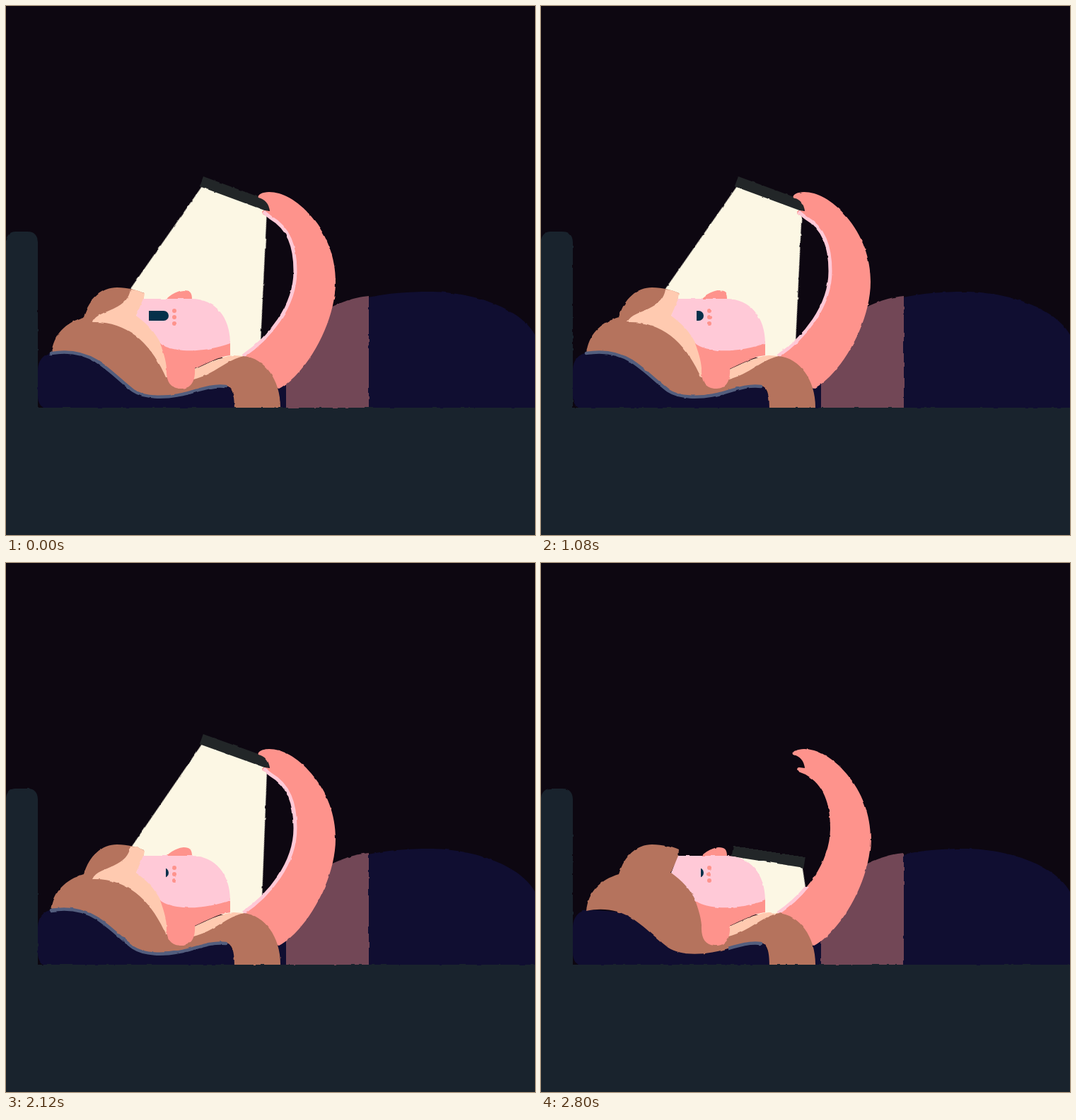
Animation of 748x748 px, one loop 2.84 s. Source, as an HTML page:

```html
<!DOCTYPE html>
<html lang="en">
<head>
<meta charset="utf-8">
<title>Late night phone</title>
<style>
  html, body { margin: 0; width: 100%; height: 100%; overflow: hidden; background: #0d0711; }
  svg { display: block; width: 100vw; height: 100vh; }

  .bed { fill: #19232d; }
  .navy { fill: #100e31; }
  .dress { fill: #724756; }
  .skin { fill: #fe938c; }
  .face { fill: #ffc9d7; }
  .hair { fill: #b5735d; }
  .glow { fill: #ffcab0; }
  .beam { fill: #fcf7e4; }
  .case { fill: #222628; }
  .eye { fill: #06304a; }
  .rim { fill: none; stroke: #ffc9d7; stroke-width: 5; stroke-linejoin: round; }
  .seam { fill: none; stroke: #535e7e; stroke-width: 4.5; stroke-linecap: round; }

  #phone, #lid, #reach { animation: 2840ms linear infinite; }
  #phone { animation-name: drop; }
  #lid { animation-name: droop; }
  #reach { animation-name: dim; }

  @keyframes drop {
    0%, 73% { transform: translate(279px, 241px) rotate(20.3deg); animation-timing-function: ease-in-out; }
    79%, 85% { transform: translate(278px, 247px) rotate(17.2deg); animation-timing-function: cubic-bezier(.5, 0, .9, .6); }
    93%, 100% { transform: translate(272px, 400px) rotate(9deg); }
  }
  @keyframes droop {
    0%, 17% { transform: translateX(0); animation-timing-function: ease-in; }
    25.35% { transform: translateX(6px); }
    38% { transform: translateX(18px); }
    43% { transform: translateX(20px); animation-timing-function: ease-out; }
    50%, 56.4% { transform: translateX(7px); animation-timing-function: ease-in-out; }
    66%, 100% { transform: translateX(24px); }
  }
  @keyframes dim {
    0%, 85% { transform: translate(0, 0); animation-timing-function: cubic-bezier(.5, 0, .9, .6); }
    93%, 100% { transform: translate(265px, 458px); }
  }
</style>
</head>
<body>
<svg viewBox="0 0 748 748">
  <defs>
    <filter id="rough" filterUnits="userSpaceOnUse" x="-12" y="-12" width="772" height="772" color-interpolation-filters="sRGB">
      <feTurbulence id="noise" type="fractalNoise" baseFrequency=".11" numOctaves="1" seed="1" result="n"/>
      <feDisplacementMap in="SourceGraphic" in2="n" scale="2.8" xChannelSelector="R" yChannelSelector="G"/>
    </filter>
    <clipPath id="lit"><rect id="reach" width="748" height="748"/></clipPath>
    <clipPath id="open"><rect id="lid" x="202" y="425" width="60" height="26"/></clipPath>
    <clipPath id="above"><rect width="748" height="497"/></clipPath>
  </defs>

  <rect width="748" height="748" fill="#0d0711"/>

  <g filter="url(#rough)">
    <g clip-path="url(#above)">
      <g id="phone">
        <path class="beam" d="M3 14 H101 L192 301 L-73 305Z"/>
        <rect class="case" width="103" height="15"/>
      </g>
    </g>

    <!-- blanket, dress, pillow -->
    <path class="navy" d="M512 412 C540 406 570 404 598 404 C662 404 728 428 748 465 L760 490 V570 H512Z"/>
    <path class="dress" d="M396 570 V500 L440 438 C462 422 490 412 513 410 V570Z"/>
    <path class="navy" d="M380 525 H396 V570 H380Z"/>
    <path class="navy" d="M60 570 C50 569 45 562 45 552 V515 C45 501 53 492 66 490 L200 500 L313 530 L330 570Z"/>

    <!-- arm -->
    <path class="skin" d="M335 495 C372 470 409 425 409 375 C409 340 400 314 374 299 L364 295 C361 292 362 289 365 289 L373 290
      C372 280 366 273 357 271 C355 268 361 263 372 263 C390 263 412 274 432 298 C454 324 466 356 466 390
      C466 448 425 520 386 541 L335 525Z"/>
    <path class="rim" clip-path="url(#lit)" d="M364 291 L374 299 C400 314 409 340 409 375 C409 425 372 470 335 495"/>

    <!-- hair -->
    <path class="hair" d="M64 492 C67 464 84 448 110 440 C118 413 136 398 157 398 C172 398 186 402 195 406 L194 417 L183 438
      H205 L235 485 V525 L265 518 C283 508 302 498 335 495 C366 497 389 530 388 570 H323
      C323 552 321 540 312 537 C290 535 268 545 250 549 C222 555 195 554 180 544 C163 531 148 515 128 502 C110 491 88 487 64 492Z"/>
    <path class="glow" d="M262 516 C283 506 302 496 322 494 L336 495 C312 500 295 521 262 529Z"/>
    <g clip-path="url(#lit)">
      <path class="glow" d="M122 447 C127 436 140 434 152 428 C167 421 174 413 176 401 C184 401 191 404 196 407 L194 417 L184 438
        H205 L235 485 V525 H226 C215 500 201 480 183 466 C166 453 145 446 122 447Z"/>
      <path class="seam" d="M64 491 C88 487 110 491 128 502 C148 515 163 531 180 544 C195 554 222 555 250 549 C268 545 290 535 311 538"/>
    </g>

    <!-- head -->
    <path class="skin" d="M226 415 C233 408 242 403 251 402 C260 402 263 405 263 415Z"/>
    <path class="skin" d="M218 477 L317 474 V494 C300 496 283 506 267 513 C268 530 262 541 248 541 C233 541 226 532 227 512 C226 500 222 488 218 477Z"/>
    <path class="face" d="M194 414 H262 C296 414 317 440 317 477 C285 489 240 492 219 478 C211 461 199 449 184 438Z"/>
    <g class="skin">
      <circle cx="238" cy="431" r="3"/>
      <circle cx="238" cy="440" r="3"/>
      <circle cx="238" cy="449" r="3"/>
    </g>

    <!-- bed frame -->
    <path class="bed" d="M-12 568 V340 L0 332 C1 323 7 319 13 319 H31 C40 319 45 325 45 334 V568 H760 V760 H-12Z"/>
  </g>

  <path class="eye" clip-path="url(#open)" d="M202 431 H223 A7 7 0 0 1 223 445 H202Z"/>
</svg>
<script>
  // Redraw the rough outlines 25 times a second.
  const noise = document.getElementById('noise');
  const LOOP = 2840, STEP = 40;
  let last = -1;

  function boil(now) {
    const seed = 1 + Math.floor(now % LOOP / STEP);
    if (seed !== last) noise.setAttribute('seed', last = seed);
    requestAnimationFrame(boil);
  }
  requestAnimationFrame(boil);
</script>
</body>
</html>
```
